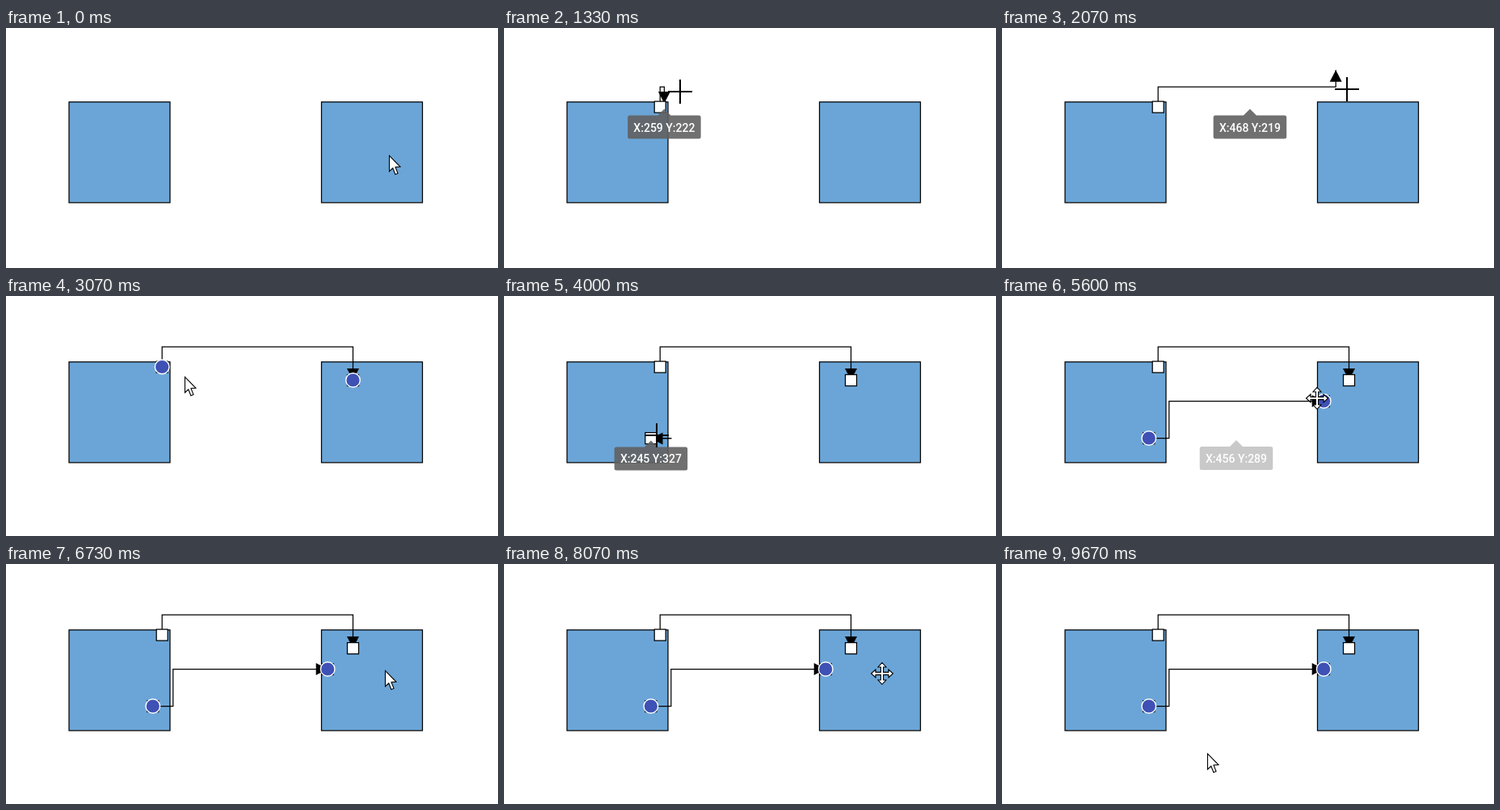
Recreate the animation shown at these times as an HTML page with a canvas. Size 609x298 px, loop 9740 ms.

```html
<!DOCTYPE html>
<html lang="en">
<head>
<meta charset="utf-8">
<title>Connecting two shapes</title>
<style>
  html, body { margin: 0; width: 100%; height: 100%; overflow: hidden; background: #fff; }
  canvas { display: block; }
</style>
</head>
<body>
<canvas id="stage" width="609" height="298"></canvas>
<script>
const ctx = document.getElementById('stage').getContext('2d');
const LOOP = 9740, STEP = 1000 / 15, SCROLL_AT = 2660, LAG = 118;

// Pointer strokes: begin, finish, then two control points and the end of a Bezier curve
const origin = [474, 158];
const strokes = [
  [0, 667, [350, 55], [270, 45], [194, 97]],
  [1133, 2333, [302, 10], [437.5, 2], [431, 112]],
  [2600, 3800, [127, -76], [140, 420], [182, 177]],
  [3933, 5133, [443, 34.5], [291, 189.5], [400, 135]],
  [5400, 6733, [342, 68], [350, 410], [469, 132]],
  [6933, 8133, [549, 254], [549, 254], [466, 133]],
  [8533, 9000, [420, 150], [250, 250], [150, 320]],
  [9533, 9667, [150, 320], [254, 235], [254, 235]]
];

const links = [
  { start: 1195, release: SCROLL_AT, from: [193.2, 98], to: [429.5, 114.5], label: [41, 143] },
  { start: 3995, release: 5460, from: [181.8, 186.5], to: [398.2, 140.5], label: [56, 154], sideways: true }
];

function pointer(t) {
  let from = origin;
  for (const [begin, finish, c1, c2, to] of strokes) {
    if (t <= begin) break;
    const u = Math.min(1, (t - begin) / (finish - begin)), e = u * u * (3 - 2 * u), q = 1 - e;
    if (u < 1) {
      return [0, 1].map(i =>
        q ** 3 * from[i] + 3 * q * q * e * c1[i] + 3 * q * e * e * c2[i] + e ** 3 * to[i]);
    }
    from = to;
  }
  return from;
}

function poly(points, fill, stroke, width = 1, closed = true) {
  ctx.beginPath();
  points.forEach(p => ctx.lineTo(...p));
  if (closed) ctx.closePath();
  if (fill) { ctx.fillStyle = fill; ctx.fill(); }
  if (stroke) { ctx.strokeStyle = stroke; ctx.lineWidth = width; ctx.stroke(); }
}

function box(x, y, size, fill) {
  poly([[x, y], [x + size, y], [x + size, y + size], [x, y + size]], fill, '#000', 1.25);
}

function port([x, y], selected) {
  box(x - 7, y - 7, 14, '#fff');
  if (!selected) return;
  ctx.beginPath();
  ctx.arc(x, y, 8.8, 0, 7);
  ctx.fillStyle = '#3f51b5';
  ctx.fill();
  ctx.strokeStyle = '#fff';
  ctx.lineWidth = 1.4;
  ctx.stroke();
}

function tooltip(x, tip, text, alpha) {
  ctx.font = '500 14px Roboto, sans-serif';
  ctx.textAlign = 'center';
  const width = ctx.measureText(text).width + 14.5, top = tip + 8;
  ctx.beginPath();
  ctx.roundRect(x - width / 2, top, width, 29, 2.5);
  ctx.moveTo(x - 8, top);
  ctx.lineTo(x, tip);
  ctx.lineTo(x + 8, top);
  ctx.fillStyle = `rgba(97,97,97,${.9 * alpha})`;
  ctx.fill();
  ctx.fillStyle = '#fff';
  ctx.fillText(text, x, top + 20);
}

function drawLink(link, t, shift) {
  const { sideways, release } = link, done = t >= release;
  const from = [link.from[0], link.from[1] - shift];
  const end = done ? [link.to[0], link.to[1] - shift] : pointer(Math.max(t - LAG, link.start - 60));
  const [x, y] = from, [ex, ey] = end;
  const bend = sideways ? x + 25 : y - 25;
  const route = sideways ? [from, [bend, y], [bend, ey], end] : [from, [x, bend], [ex, bend], end];
  poly(route, null, '#000', 1.25, false);

  const back = (sideways ? ex < bend : ey < bend) ? 14.5 : -14.5;
  poly(sideways
    ? [end, [ex + back, ey - 7.5], [ex + back, ey + 7.5]]
    : [end, [ex - 7.5, ey + back], [ex + 7.5, ey + back]], '#000');

  const selected = done && !(link === links[0] && t >= links[1].start);
  port(from, selected);
  if (done) port(end, selected);

  const alpha = done ? 1 - (t - release) / 225 : 1;
  if (alpha <= 0) return;
  const half = sideways ? 0 : 7.5;
  const middle = (Math.min(x, ex - half) + Math.max(x, ex + half)) / 2;
  const [px, py] = pointer(Math.min(t, release - 100));
  const text = `X:${Math.round(px + link.label[0])} Y:${Math.round(py + link.label[1])}`;
  tooltip(middle, Math.max(y, ey) + 2.5, text, alpha);
}

function crossCursor() {
  ctx.fillStyle = '#000';
  ctx.fillRect(-15, -1, 30, 2);
  ctx.fillRect(-1, -15, 2, 30);
}

function moveCursor() {
  let arm = [[1.6, -1.6], [1.6, -8], [5, -8], [0, -13.5], [-5, -8], [-1.6, -8]];
  const outline = [];
  for (let i = 0; i < 4; i++) {
    outline.push(...arm);
    arm = arm.map(([x, y]) => [y, -x]);
  }
  poly(outline, '#fff', '#000', 1.1);
}

function arrowCursor() {
  poly([[.5, .5], [.5, 20], [4.8, 16], [7.9, 23.7], [11, 22.4], [8, 14.8], [14, 14.4]], '#fff', '#000', 1.1);
}

function cursorAt(t, x, y) {
  const within = (a, b) => t >= a && t < b;
  if (links.some(l => within(l.start, l.release))) return crossCursor;
  if (links.some(l => within(l.release, l.release + 200))) return moveCursor;
  const onShape = x < 516 && y < 207;
  return onShape && within(6995, 8595) ? moveCursor : arrowCursor;
}

function draw(now) {
  const t = Math.floor((now % LOOP + 5) / STEP) * STEP;
  const shift = t >= SCROLL_AT ? 10 : 0;
  ctx.fillStyle = '#fff';
  ctx.fillRect(0, 0, 609, 298);
  for (const x of [78, 390.5]) box(x, 91.75 - shift, 125, '#6ba5d7');
  for (const link of links) if (t >= link.start) drawLink(link, t, shift);

  const [x, y] = pointer(t);
  ctx.save();
  ctx.translate(Math.round(x), Math.round(y));
  cursorAt(t, x, y)();
  ctx.restore();
}

const began = performance.now();
(function tick() {
  draw(performance.now() - began);
  requestAnimationFrame(tick);
})();
</script>
</body>
</html>
```
